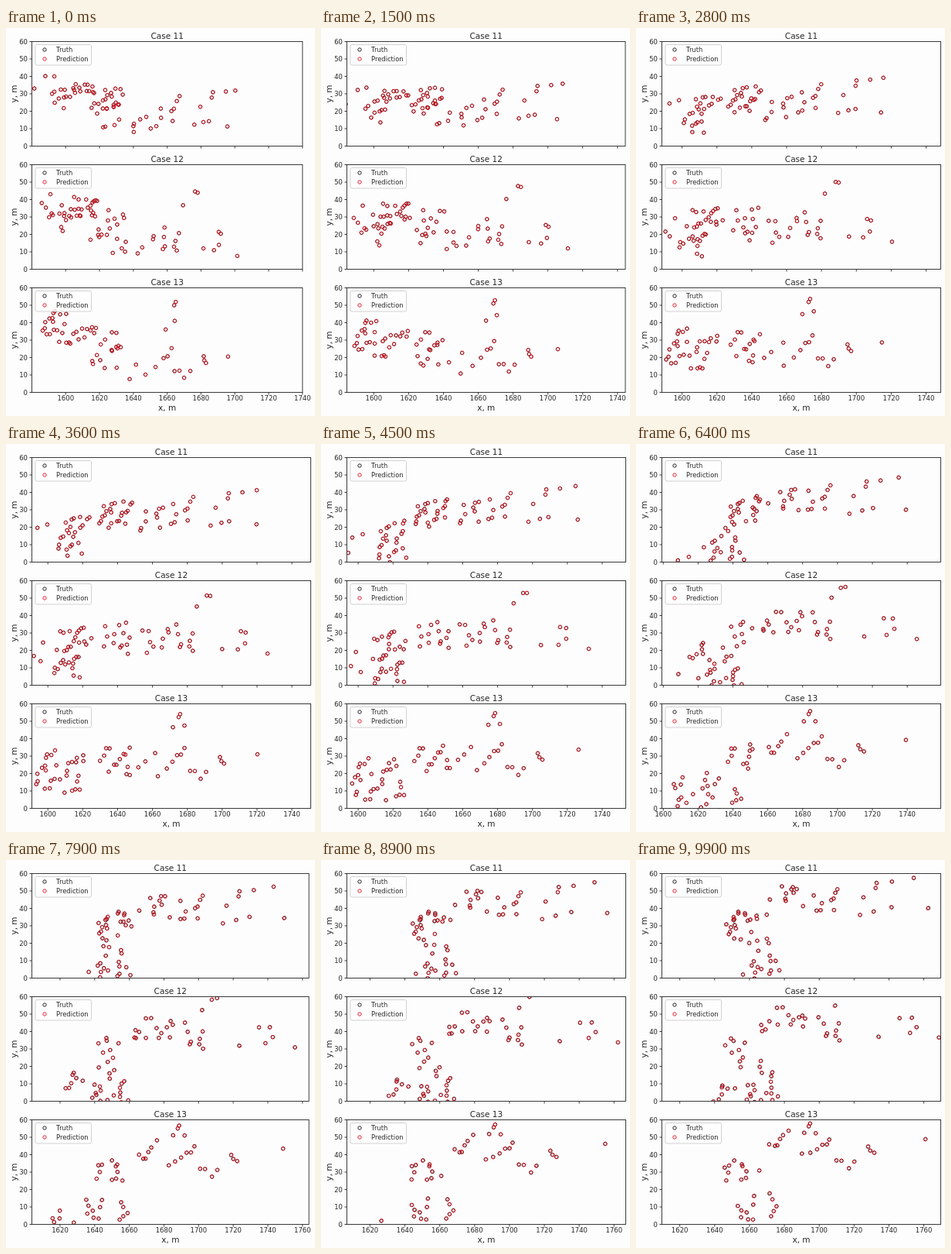
Animation, 400 px wide and 501 px high, one loop 10000 ms. Source, as an HTML page:

```html
<!DOCTYPE html>
<html lang="en">
<head>
<meta charset="utf-8">
<title>Truth and prediction</title>
<style>
  html, body { margin: 0; width: 100%; height: 100%; overflow: hidden; background: #fefdfe; }
  svg { display: block; width: 400px; height: 501px; font-family: "DejaVu Sans", sans-serif; fill: #262626; }
  .big { font-size: 10.5px; text-anchor: middle; }
  .tick { font-size: 8.5px; text-anchor: middle; }
  .ytick { font-size: 8.5px; text-anchor: end; }
  .key { font-size: 8.4px; }
  .line { fill: none; stroke: #262626; stroke-width: .9; }
  .truth { fill: none; stroke: #111; stroke-width: .9; }
  .guess { fill: none; stroke: #e0101c; stroke-width: .9; }
  .box { fill: #fff; fill-opacity: .8; stroke: #ccc; stroke-width: .9; }
</style>
</head>
<body>
<svg id="stage" viewBox="0 0 400 501"></svg>
<script>
const LEFT = 33.5, HEIGHT = 135, SPAN = 160, UNIT = 2.25;
const STEPS = 100, STEP_MS = 100, REF = 45;
const stage = document.getElementById('stage');

// At step REF: leading markers in pixels from the axes corner,
// a scattered tail (count, x range, y range), and sizes of the core and middle groups.
const cases = [
  { lead: [296,98, 299,55, 276,95, 257,87, 258,94, 241,75, 235,52, 250,56, 261,58, 212,89],
    tail: [23, 39, 78, 0, 55], core: 22, middle: 17 },
  { lead: [313,47, 276,75, 284,74, 284,60, 274,52, 251,52, 228,119, 233,119, 216,106, 207,55],
    tail: [32, 33, 76, 0, 70], core: 13, middle: 16 },
  { lead: [300,76, 247,71, 249,66, 253,63, 222,43, 229,52, 192,123, 190,119, 183,108, 198,109],
    tail: [27, 5, 75, 8, 65], core: 14, middle: 11 }
];

// Flow seen from the moving window: x, y in metres, then velocity in m/s.
const flow = [
  [4, 24, -1.5, -6], [10, 10, 3.5, -7], [20, 20, 0, -5.5], [27, 34, -3, -2.5], [29, 11, 6, -3.5],
  [42, 3, 7, -.5], [50, 13, 6.5, 1.5], [44, 29, -.5, 0], [48, 41, -3.3, 0], [61, 24, 3, 4.8],
  [71, 40, .3, 3.9], [92, 38, 1.5, 2.4], [131, 26, 4, 3], [116, 42, 1.6, 2.4], [86, 55, 0, .6]
];

// Evenly spread, repeatable scatter inside a rectangle, with a little jitter.
function scatter(count, x0, x1, y0, y1, seed) {
  const part = v => v - Math.floor(v);
  return Array.from({ length: count }, (_, i) => {
    const wobble = .07 * Math.sin(i * 12.9 + seed * 40);
    return [
      x0 + (x1 - x0) * part(seed + i * .7549 + wobble),
      y0 + (y1 - y0) * part(seed * 2 + i * .5698 - wobble)
    ];
  });
}

function cloud({ lead, tail, core, middle }, n) {
  const seed = .31 + n * .37;
  const points = [
    ...scatter(...tail, seed),
    ...scatter(3, 0, 24, 4, 48, seed),
    ...scatter(core, 86, 134, 46, 82, seed),
    ...scatter(middle, 142, 215, 47, 84, seed)
  ];
  for (let i = 0; i < lead.length; i += 2) points.push([lead[i], lead[i + 1]]);
  return points.map(([x, y]) => [x / 2.256, y / UNIT]);
}

function velocity(x, y) {
  let sum = 0, u = 0, v = 0;
  for (const [fx, fy, fu, fv] of flow) {
    const w = 1 / ((x - fx) ** 2 + (y - fy) ** 2 + 10) ** 2;
    sum += w;
    u += w * fu;
    v += w * fv;
  }
  return [u / sum, v / sum];
}

function advance([x, y], dt) {
  const [u, v] = velocity(x, y);
  const [um, vm] = velocity(x + u * dt / 2, y + v * dt / 2);
  return [x + um * dt, y + vm * dt];
}

function trace(points) {
  const track = [];
  track[REF] = points;
  for (let k = REF; k > 0; k--) track[k - 1] = track[k].map(p => advance(p, -.1));
  for (let k = REF; k < STEPS - 1; k++) track[k + 1] = track[k].map(p => advance(p, .1));
  return track;
}

function add(tag, attrs, parent = stage) {
  const el = document.createElementNS('http://www.w3.org/2000/svg', tag);
  for (const name in attrs) el.setAttribute(name, attrs[name]);
  return parent.appendChild(el);
}

function text(str, x, y, cls, attrs = {}) {
  const el = add('text', { x, y, class: cls, ...attrs });
  el.textContent = str;
  return el;
}

const ring = (x, y) =>
  `M${(x - 2.2).toFixed(2)} ${y.toFixed(2)}a2.2 2.2 0 1 0 4.4 0a2.2 2.2 0 1 0 -4.4 0`;

const panels = cases.map((item, n) => {
  const top = 17.5 + 159 * n, base = top + HEIGHT;
  const clip = add('clipPath', { id: 'axes' + n });
  const view = add('rect', { x: LEFT, y: top, height: HEIGHT }, clip);
  const dots = add('g', { 'clip-path': `url(#axes${n})` });
  const truth = add('path', { class: 'truth' }, dots);
  const guess = add('path', { class: 'guess' }, dots);

  add('rect', { x: 38, y: top + 4, width: 72.5, height: 26.5, rx: 2, class: 'box' });
  add('path', { d: ring(50, top + 10.5), class: 'truth' });
  add('path', { d: ring(50, top + 22.5), class: 'guess' });
  text('Truth', 65, top + 13.7, 'key');
  text('Prediction', 65, top + 25.7, 'key');

  for (let m = 0; m <= 60; m += 10) {
    const y = base - m * UNIT;
    add('path', { d: `M${LEFT} ${y}h-3`, class: 'line' });
    text(m, LEFT - 5.5, y + 3.2, 'ytick');
  }
  text('y, m', 0, 0, 'big', { transform: `translate(14 ${top + HEIGHT / 2}) rotate(-90)` });
  const frame = add('rect', { x: LEFT, y: top, height: HEIGHT, class: 'line' });
  const ticks = add('path', { class: 'line' });
  const title = text('Case ' + (11 + n), 0, top - 4, 'big');
  return { base, view, truth, guess, frame, ticks, title, track: trace(cloud(item, n)) };
});

const xLabel = text('x, m', 0, 493.5, 'big');
const tickLabels = Array.from({ length: 9 }, () => text('', 0, 481.2, 'tick'));

function draw(k) {
  const origin = 1580.02 + .3 * k;
  const first = Math.ceil(origin / 20) * 20;
  const last = Math.floor((origin + SPAN + .03) / 20) * 20;
  // The axes shrink so that the last label stays on the stage.
  const width = Math.min(361, 350.3 * SPAN / (last - origin));
  const scale = width / SPAN;
  const middle = LEFT + width / 2;
  const marks = [];
  for (let m = first; m <= last; m += 20) marks.push([m, LEFT + (m - origin) * scale]);

  tickLabels.forEach((label, i) => {
    const mark = marks[i];
    label.textContent = mark ? mark[0] : '';
    if (mark) label.setAttribute('x', mark[1]);
  });
  xLabel.setAttribute('x', middle);

  const drift = .15 + .5 * k / STEPS;
  for (const p of panels) {
    p.view.setAttribute('width', width);
    p.frame.setAttribute('width', width);
    p.title.setAttribute('x', middle);
    p.ticks.setAttribute('d', marks.map(([, x]) => `M${x} ${p.base}v3`).join(''));
    let black = '', red = '';
    p.track[k].forEach(([mx, my], i) => {
      const x = LEFT + mx * scale, y = p.base - my * UNIT;
      black += ring(x, y);
      red += ring(x + drift * Math.sin(i * 7.3), y + drift * Math.cos(i * 4.1));
    });
    p.truth.setAttribute('d', black);
    p.guess.setAttribute('d', red);
  }
}

const began = performance.now();
let shown = -1;
function tick() {
  const k = Math.floor((performance.now() - began) / STEP_MS) % STEPS;
  if (k !== shown) draw(shown = k);
  requestAnimationFrame(tick);
}
tick();
</script>
</body>
</html>
```
